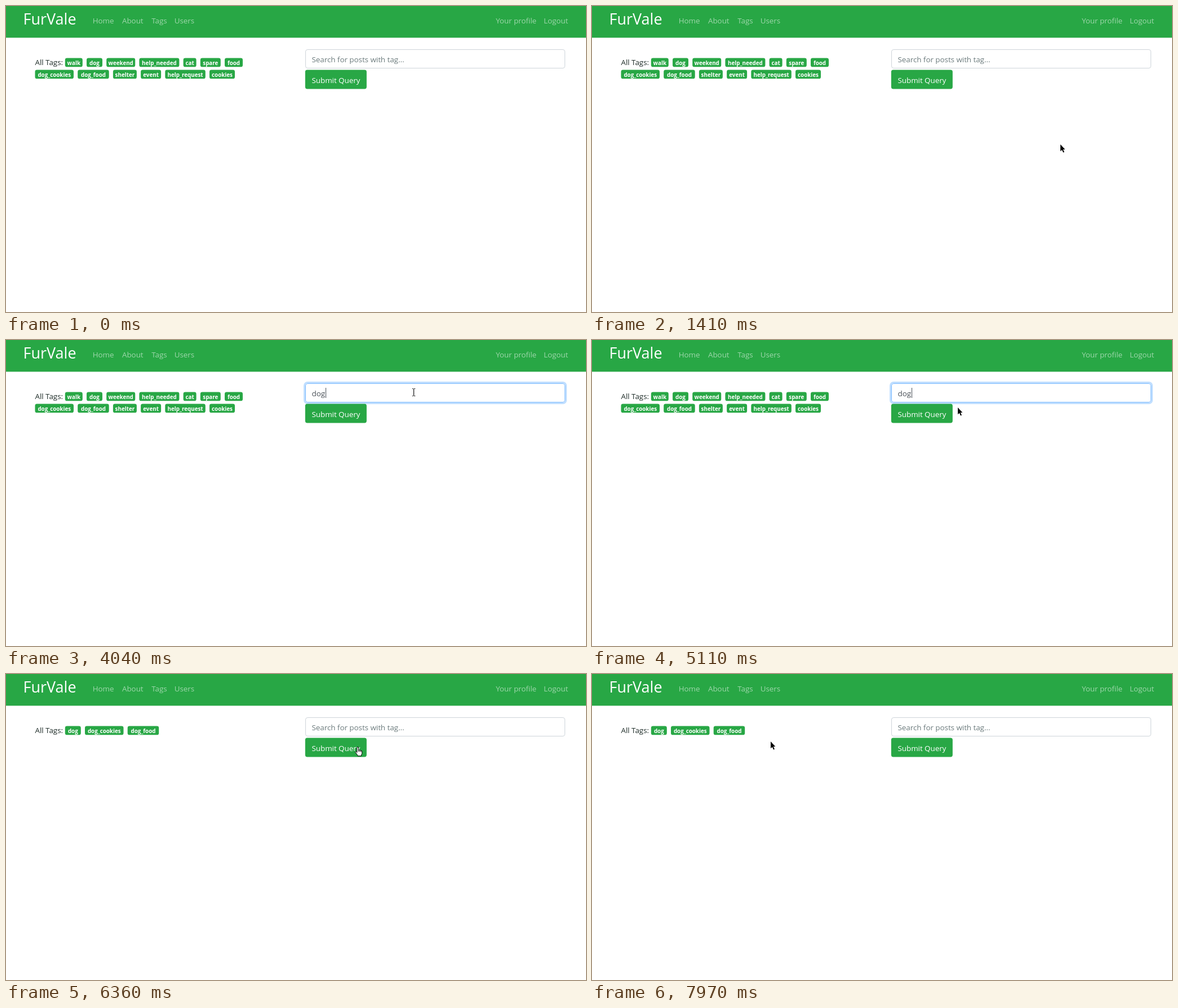
These frames come from a looping animation (1029 px wide and 544 px high, 8 s). An HTML page:

```html
<!DOCTYPE html>
<html lang="en">
<head>
<meta charset="utf-8">
<title>Tag search</title>
<style>
  html, body { margin: 0; width: 100%; height: 100%; overflow: hidden; background: #fff; }
  svg { display: block; width: 1029px; height: 544px; }
  text { font: 13.4px "Open Sans", "Noto Sans", sans-serif; letter-spacing: -.03px; white-space: pre; }
  .brand { font-size: 27px; letter-spacing: 0; fill: #fff; }
  .nav { fill: #fff; fill-opacity: .55; }
  .badge { font-size: 9.8px; font-weight: 700; letter-spacing: 0; fill: #fff; text-anchor: middle; }
</style>
</head>
<body>
<svg viewBox="0 0 1029 544">
  <rect width="1029" height="56.4" fill="#28a745"/>
  <text class="brand" x="30.5" y="33">FurVale</text>
  <g class="nav">
    <text x="153.7" y="31">Home</text>
    <text x="206" y="31">About</text>
    <text x="258.3" y="31">Tags</text>
    <text x="298.7" y="31">Users</text>
    <text x="869" y="31">Your profile</text>
    <text x="954" y="31">Logout</text>
  </g>

  <text x="51.5" y="105" fill="#1f2d29">All Tags:</text>
  <g id="allTags"></g>
  <g id="foundTags"></g>

  <rect id="glow" x="529.5" y="75.5" width="464" height="37" rx="5.5" fill="none" stroke="#007bff" stroke-opacity=".25" stroke-width="3"/>
  <rect id="field" x="531.5" y="77.5" width="460" height="33" rx="3.6" fill="#fff"/>
  <text id="query" x="542.5" y="100"></text>
  <rect id="caret" y="85" width="1" height="18" fill="#495057"/>

  <rect id="ring" x="529.5" y="112.3" width="111.5" height="36.4" rx="5" fill="none" stroke="#48b461" stroke-opacity=".5" stroke-width="3"/>
  <rect id="button" x="530.8" y="113.6" width="109" height="33.8" rx="3.6"/>
  <text x="542.5" y="137" fill="#fff">Submit Query</text>

  <g id="arrow">
    <path d="M0 0V12.2L2.8 9.7L5 14.6L6.9 13.8L4.8 9H8.3Z" stroke="#fff" stroke-width="1.6" paint-order="stroke"/>
  </g>
  <g id="beam">
    <path d="M-2.5 -6.5H-.7M.7 -6.5H2.5M0 -6V6M-2.5 6.5H-.7M.7 6.5H2.5" fill="none" stroke="#000" stroke-width="1.1"/>
  </g>
  <g id="hand">
    <path d="M-1.3 10V1Q-1.3 -.3 0 -.3T1.3 1V5.5Q2.3 4.5 3.6 5.8Q4.8 5 5.8 6.4Q7.6 5.8 7.6 7.8V10.5Q7.6 12.5 6.3 14V15.7H-.2V14.5L-3.8 9.6Q-4.6 8.2 -3.4 7.7Q-2.5 7.4 -1.3 9M1.3 5.5V8M3.6 6V8.3M5.8 6.6V8.6" fill="#fff" stroke="#000" stroke-width="1"/>
  </g>
</svg>
<script>
const LOOP = 8000, RELOAD = 6360, PRESS = 6210, FOCUS = 2330;
const $ = id => document.getElementById(id);
const set = (id, attrs) => { for (const k in attrs) $(id).setAttribute(k, attrs[k]); };
const show = (id, on) => set(id, { visibility: on ? 'visible' : 'hidden' });
const clamp = v => Math.min(1, Math.max(0, v));
const ease = v => v * v * (3 - 2 * v);
const fade = (t, start) => ease(clamp((t - start) / 150));
const mix = (a, b, p) => a + (b - a) * p;
const blend = (a, b, p) => `rgb(${a.map((v, i) => Math.round(mix(v, b[i], p)))})`;

const GREEN = [40, 167, 69], HOVER = [33, 136, 56], PRESSED = [30, 126, 52];
const GREY = [206, 212, 218], BLUE = [128, 189, 255];

const tagWidth = {
  walk: 31, dog: 28, weekend: 51, help_needed: 71, cat: 23, spare: 36, food: 32,
  dog_cookies: 68.5, dog_food: 55.5, shelter: 42, event: 36, help_request: 71.5, cookies: 45
};

function addTags(id, names, x, y) {
  for (const name of names.split(' ')) {
    const w = tagWidth[name];
    $(id).insertAdjacentHTML('beforeend',
      `<rect x="${x}" y="${y}" width="${w}" height="15.8" rx="3.4" fill="#28a745"/>
       <text class="badge" x="${x + w / 2}" y="${y + 12}">${name}</text>`);
    x += w + 7.2;
  }
}
addTags('allTags', 'walk dog weekend help_needed cat spare food', 104.8, 92.5);
addTags('allTags', 'dog_cookies dog_food shelter event help_request cookies', 51.5, 113.5);
addTags('foundTags', 'dog dog_cookies dog_food', 104.8, 92.5);

// Pointer stops: time, x, y
const path = [
  [160, 947, 542], [340, 941, 523], [740, 941, 523], [1090, 914, 451],
  [1410, 832, 247], [1540, 763, 140], [1560, 763, 140], [1820, 723, 93],
  [4650, 723, 93], [5340, 624, 130], [7200, 624, 130], [7970, 317, 120], [LOOP, 317, 120]
];

function pointerAt(t) {
  const i = Math.max(1, path.findIndex(p => p[0] > t));
  const [t0, x0, y0] = path[i - 1], [t1, x1, y1] = path[i];
  let p = clamp((t - t0) / (t1 - t0));
  if (t0 >= 1560) p = ease(p);
  return [mix(x0, x1, p), mix(y0, y1, p)];
}

function drawPointer(t) {
  const [x, y] = pointerAt(t);
  const inX = x > 531 && x < 992;
  const kind = inX && y > 77 && y < 111 ? 'beam'
    : inX && x < 640 && y > 114 && y < 147 ? 'hand' : 'arrow';
  for (const id of ['arrow', 'beam', 'hand']) show(id, t >= 160 && id === kind);
  set(kind, { transform: `translate(${Math.round(x) + (kind === 'beam' ? .5 : 0)} ${Math.round(y)})` });
}

const typeTimes = [3300, 3630, 3910];
const blinks = [FOCUS, 2840, 3300, 4420, 4950, 5520, 6030, PRESS];

function drawField(t) {
  const loaded = t >= RELOAD;
  const typed = loaded ? 0 : typeTimes.filter(s => t >= s).length;
  const focus = loaded ? 0 : fade(t, FOCUS) - fade(t, PRESS);
  set('glow', { opacity: focus });
  set('field', { stroke: blend(GREY, BLUE, focus) });
  $('query').textContent = typed ? 'dog'.slice(0, typed) : 'Search for posts with tag...';
  set('query', { fill: typed ? '#495057' : '#6c7b7d' });
  set('caret', { x: [542, 551, 559, 567][typed] });
  show('caret', blinks.filter(s => t >= s).length % 2 === 1);
}

function drawButton(t) {
  const loaded = t >= RELOAD;
  const hover = loaded ? fade(t, 6400) - fade(t, 7500) : fade(t, 5160);
  const press = loaded ? 0 : fade(t, PRESS);
  set('button', { fill: press ? blend(HOVER, PRESSED, press) : blend(GREEN, HOVER, hover) });
  set('ring', { opacity: press });
}

function frame(now) {
  const t = now % LOOP;
  show('allTags', t < RELOAD);
  show('foundTags', t >= RELOAD);
  drawField(t);
  drawButton(t);
  drawPointer(t);
  requestAnimationFrame(frame);
}
requestAnimationFrame(frame);
</script>
</body>
</html>
```
